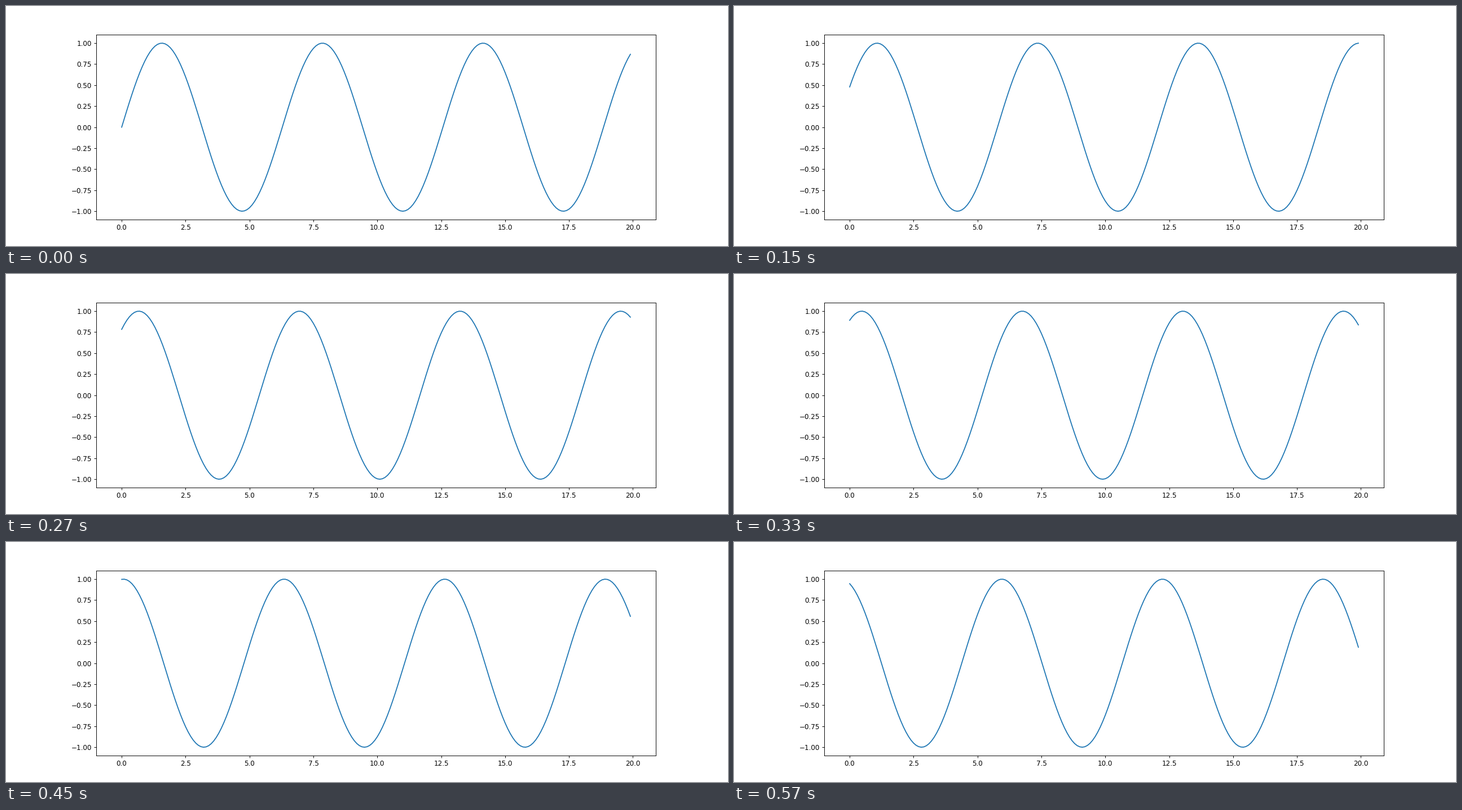
A matplotlib script that plays this animation: 1280 by 427 pixels, repeating every 0.6 s.

```python
import matplotlib.pyplot as plt
import numpy as np
from matplotlib.animation import FuncAnimation

FRAMES = 20
INTERVAL = 30  # ms
PHASE_STEP = 0.1

fig, ax = plt.subplots(figsize=(15, 5.004), dpi=256 / 3)
x = np.arange(0, 20, 0.1)
line, = ax.plot(x, np.sin(x))


def update(frame):
    line.set_ydata(np.sin(x + PHASE_STEP * frame))
    return line,


anim = FuncAnimation(fig, update, frames=FRAMES, interval=INTERVAL, repeat=True)
plt.show()
```
